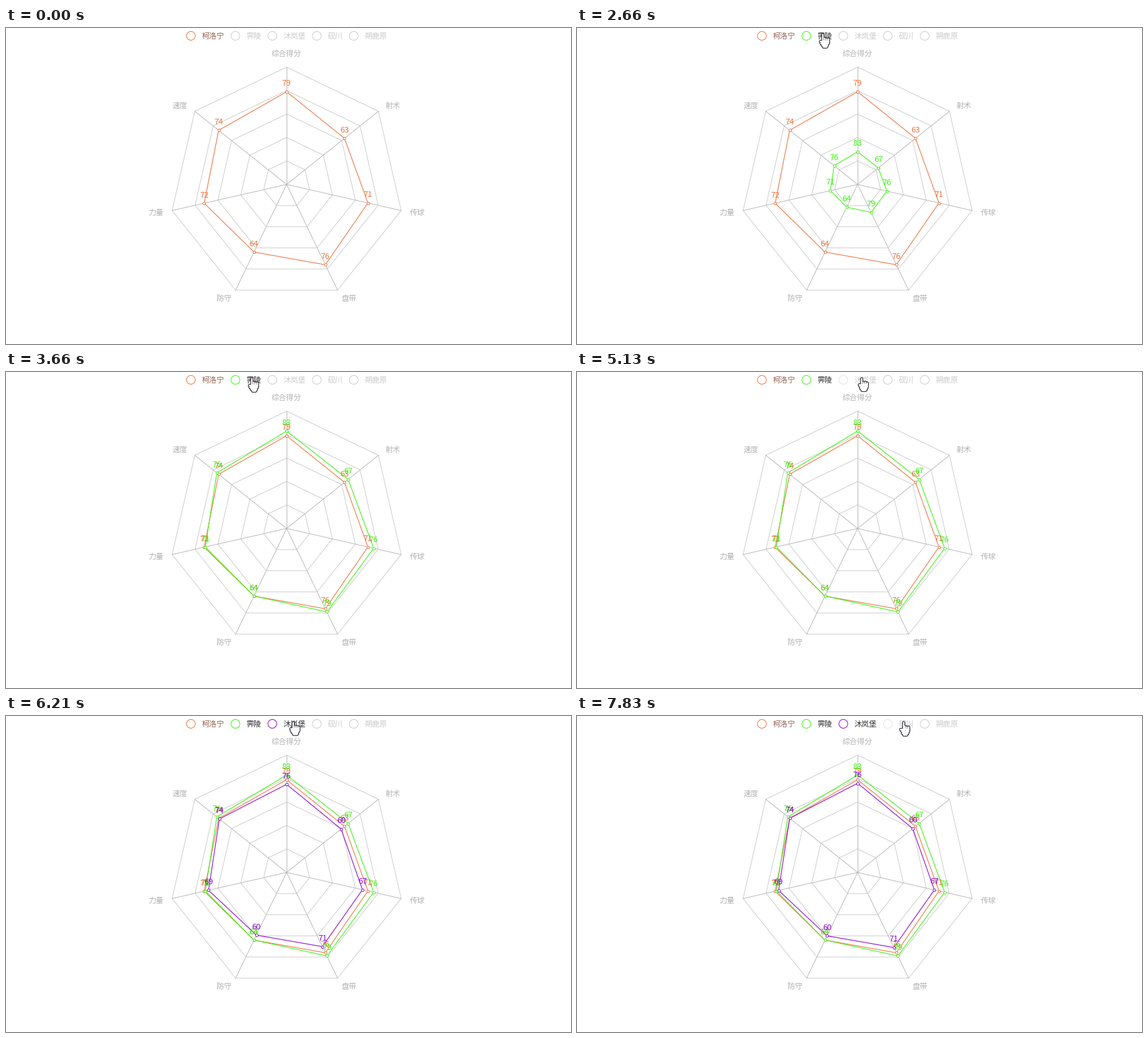
A matplotlib script for the animation above (7.99 s loop, 902x505 px).

```python
import numpy as np
import matplotlib.pyplot as plt
from matplotlib.animation import FuncAnimation
from matplotlib.patches import Circle, Polygon

W, H, DPI = 902, 505, 64
LOOP, STEP = 7990, 34
PT = 72 / DPI                      # points per pixel
CENTER, RADIUS = np.array([448.0, 250.0]), 187.5
GRID, SPOKE, LABEL = "#cccccc", "#b8b8b8", "#b2b2b2"
OFF, HOVER, INK = "#cccccc", "#e4e4e4", "#333333"
NEVER = 2 * LOOP

plt.rcParams["font.family"] = "Noto Sans CJK JP"

AXES = "综合得分 射术 传球 盘带 防守 力量 速度".split()
ANGLES = 2 * np.pi * np.arange(len(AXES)) / len(AXES)
UNIT = np.column_stack([np.sin(ANGLES), -np.cos(ANGLES)])

TEAMS = [
    dict(name="柯洛宁", color="#ef7440", ink="#95604e", press=-LOOP, start=-LOOP,
         values=[79, 63, 71, 76, 64, 72, 74]),
    dict(name="霁陵", color="#3af50f", press=2410, start=2610,
         values=[83, 67, 76, 79, 64, 71, 76]),
    dict(name="沐岚堡", color="#8a06d2", press=5440, start=5560,
         values=[76, 60, 67, 71, 60, 69, 74]),
    dict(name="砚川"),
    dict(name="朔鹿原"),
]

# pointer stops: departure, arrival, position
ENTRY = (833, 488)
STOPS = [(1000, 1780, (427, 41)), (1865, 2170, (391.5, 8)),
         (4640, 5200, (457.5, 7.5)), (7250, 7815, (519.7, 8))]

fig = plt.figure(figsize=(W / DPI, H / DPI), dpi=DPI, facecolor="white")
ax = fig.add_axes([0, 0, 1, 1])
ax.set_xlim(0, W)
ax.set_ylim(H, 0)
ax.axis("off")


def line(pts, color, z, width=1.0, **kw):
    return ax.plot(*np.transpose(pts), color=color, lw=width * PT, zorder=z, **kw)[0]


def label(x, y, s, color, ha="left", size=12, z=5):
    """Text whose glyphs are centred vertically on y."""
    return ax.text(x, y + 4.5, s, color=color, ha=ha, va="baseline",
                   fontsize=size * PT, zorder=z)


def closed(pts):
    return np.vstack([pts, pts[:1]])


def draw_grid():
    for k in range(1, 6):
        line(closed(CENTER + UNIT * RADIUS * k / 5), GRID, 1)
    for u, name in zip(UNIT, AXES):
        line([CENTER, CENTER + u * RADIUS], SPOKE, 1.5)
        x, y = CENTER + u * (RADIUS + 14.5)
        side = int(np.sign(round(u[0], 3)))
        if side == 0:
            y -= 6.5                # the top name sits above its spoke
        label(x, y - 0.8, name, LABEL, ("center", "left", "right")[side])


class Team:
    def __init__(self, x, z, name, color=OFF, ink=INK, press=NEVER, start=NEVER,
                 values=()):
        self.color, self.ink, self.press, self.start = color, ink, press, start
        self.left, self.right = x - 8, x + 17 + 12 * len(name)
        self.ring = ax.add_patch(Circle((x, 12.5), 7, fill=False, lw=PT, zorder=5))
        self.text = label(x + 17, 12, name, OFF)
        self.reach = UNIT[:len(values)] * RADIUS * np.reshape(values, (-1, 1)) / 100
        self.shape = line(np.zeros((1, 2)), color, z, 1.1, marker="o", ms=4.2 * PT,
                          mfc="white", mec=color, mew=0.9 * PT)
        self.values = [label(0, 0, v, color, "center", 13, z + 1) for v in values]

    def hovered(self, tip):
        return tip is not None and tip[1] < 20 and self.left <= tip[0] <= self.right

    def update(self, t, tip):
        on = t >= self.start
        self.ring.set_edgecolor(self.color if on else HOVER if self.hovered(tip) else OFF)
        self.text.set_color(self.ink if on else OFF)
        for art in [self.shape, *self.values]:
            art.set_visible(on)
        if on:
            u = (t - self.start) / 1000
            grow = 1 - 2 ** (-10 * u) if u < 1 else 1
            pts = CENTER + self.reach * grow
            self.shape.set_data(*closed(pts).T)
            for (x, y), txt in zip(pts, self.values):
                txt.set_position((x, y - 9.5))


def hand_strokes():
    """Fingers and palm as round-capped strokes, relative to the fingertip."""
    strokes = []
    for k in range(4):
        x, top = 0.8 + 2.8 * k, 7.6 + 0.6 * k if k else 2.3
        strokes += [(x, top), (x, 14), (np.nan, np.nan)]
    for y in np.linspace(12.5, 21.7, 7):
        left, right = -3.7 + 0.55 * (y - 12.5), 9 - 0.4 * max(0, y - 16)
        strokes += [(left, y), (right, y), (np.nan, np.nan)]
    return np.array(strokes)


def pointer(t):
    """Tip of the mouse pointer, or None before it enters."""
    if t < 1030:
        return None
    tip = np.array(ENTRY, float)
    for t0, t1, stop in STOPS:
        u = np.clip((t - t0) / (t1 - t0), 0, 1)
        tip += (np.array(stop) - tip) * u * u * (3 - 2 * u)
    return tip


draw_grid()
teams, x = [], 295.2
for i, spec in enumerate(TEAMS):
    teams.append(Team(x, 2 + i * 0.2, **spec))
    x += 35 + 12 * len(spec["name"])

DARK = "#14141e"
ARROW = np.array([(0.5, 0.5), (0.5, 16.5), (4, 13.2), (6.6, 18.8), (9, 17.8),
                  (6.5, 12.2), (11.2, 12)])
HAND = hand_strokes()
arrow = ax.add_patch(Polygon(ARROW, fc="white", ec=DARK, lw=PT, zorder=10))
hand = [line(HAND, color, z, width, solid_capstyle="round")
        for color, z, width in ((DARK, 10, 4.6), ("white", 11, 2.5))]
click = ax.add_patch(Circle((0, 0), 12, fc=(1, 1, 0, 0.47), ec="none", zorder=9))


def update(i):
    t = (i + 0.5) * STEP
    tip = pointer(t)
    for team in teams:
        team.update(t, tip)
    over = any(team.hovered(tip) for team in teams)
    arrow.set_visible(tip is not None and not over)
    click.set_visible(any(0 <= t - team.press < 170 for team in teams))
    for stroke in hand:
        stroke.set_visible(over)
    if tip is not None:
        arrow.set_xy(ARROW + tip)
        click.center = tuple(tip)
        for stroke in hand:
            stroke.set_data(*(HAND + tip).T)
    return []


anim = FuncAnimation(fig, update, frames=LOOP // STEP, interval=STEP,
                     repeat=True, repeat_delay=0, blit=False)
plt.show()
```
